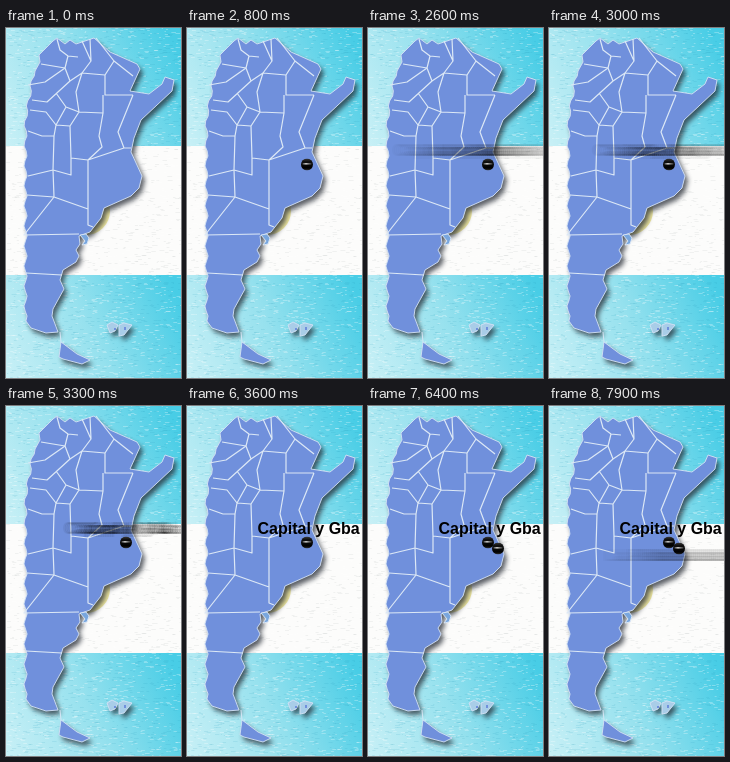
Recreate the animation shown at these times as an HTML page with a canvas. Size 175 px wide and 350 px high, loop 8000 ms.

```html
<!DOCTYPE html>
<html lang="es">
<head>
<meta charset="utf-8">
<title>Mapa</title>
<style>
html, body { margin: 0; width: 100%; height: 100%; overflow: hidden; }
canvas { display: block; width: 175px; height: 350px; }
</style>
</head>
<body>
<canvas id="stage" width="175" height="350"></canvas>
<script>
const W = 175, H = 350, LOOP = 8000, STEP = 100;
const ctx = document.getElementById('stage').getContext('2d');

function layer() {
  const c = document.createElement('canvas');
  c.width = W;
  c.height = H;
  return c.getContext('2d');
}

function random(seed) {
  return () => (seed = (seed * 16807) % 2147483647) / 2147483647;
}

// The east coast is traced; the Andes side follows a gentle wave.
function mainland() {
  let d = `M47 13 L51 10 59 16 64 12 70 16 88 10 104 24 131 36 134 41 124 63 143 66 156 56
    159 49 168 52 166 63 135 92 128 110 125 124 136 148 133 160 125 168 98 180 95 190
    84 204 73 208 74 216 70 222 73 228 70 234 57 242 54 252 58 261 47 281 46 288 52 304 40 305 25 300`;
  for (let y = 293; y > 40; y -= 5) {
    const lean = y > 90 ? 0 : (90 - y) * 0.18;
    d += ` L${19.5 + lean + 1.6 * Math.sin(y * 0.31)} ${y}`;
  }
  return new Path2D(d + ' L34 34 33 27 Z');
}

const MAINLAND = mainland();
const FUEGO = new Path2D('M55 314 L71 326 84 332 76 336 57 331 53 329 Z');
const PENINSULA = new Path2D('M74 207 L80 206 83 210 81 216 76 217 79 213 Z');
const ISLANDS = new Path2D(`M101 297 L106 294 112 297 109 303 104 305 Z
  M113 297 L118 295 126 297 118 307 113 308 Z`);
const BORDERS = new Path2D(`M51 11 L54 22 62 28 72 29 M62 28 L59 40 35 36
  M84 11 L85 33 76 45 99 47 M76 13 L85 33 M90 10 L108 33 127 48
  M108 33 L99 47 V67 H127 M76 45 L70 64 73 84 97 85 V67
  M22 57 L39 54 59 40 64 53 76 45 M26 72 L41 74 64 53 M50 65 L60 79 73 84
  M24 82 L40 84 50 97 60 79 M22 103 L36 108 H48 L50 97 64 98 73 84
  M64 98 L65 130 82 132 M48 108 L47 142 65 147 V130
  M97 85 L93 108 96 119 82 132 V197 L87 199 M127 67 L112 104 118 120 82 132 M118 120 H125
  M22 148 L47 142 48 169 82 181 M21 167 L48 169 18 207 73 206 M20 245 L56 247`);

function drawBackground(g) {
  g.fillStyle = '#fcfcfb';
  g.fillRect(0, 0, W, H);
  for (const [top, bottom] of [[0, 118], [247, H]]) {
    const sky = g.createLinearGradient(0, bottom, W, top + 30);
    sky.addColorStop(0, '#c8f0f6');
    sky.addColorStop(0.5, '#96e1ee');
    sky.addColorStop(1, '#48cde6');
    g.fillStyle = sky;
    g.fillRect(0, top, W, bottom - top);
  }
  // Fine woven paper grain.
  const rnd = random(71);
  for (let i = 0; i < 3200; i++) {
    const x = rnd() * W, y = Math.floor(rnd() * H), length = 1 + rnd() * 4;
    const white = y >= 118 && y < 247;
    g.fillStyle = rnd() < 0.5 ? 'rgba(255,255,255,.28)'
      : white ? 'rgba(120,130,135,.09)' : 'rgba(35,150,180,.12)';
    g.fillRect(x, y, length, 1);
  }
  g.fillStyle = '#eee7a0';
  g.beginPath();
  g.arc(80, 183, 24, 0, 7);
  g.fill();
}

function drawLand(g, shape, blue = '#7090dc') {
  g.save();
  g.shadowColor = 'rgba(35,40,50,.75)';
  g.shadowBlur = 5;
  g.shadowOffsetX = 3;
  g.shadowOffsetY = 4;
  g.fillStyle = blue;
  g.fill(shape);
  g.restore();
  g.strokeStyle = '#d4e2f5';
  g.lineWidth = 0.9;
  g.stroke(shape);
}

const base = layer();
drawBackground(base);
base.lineJoin = 'round';
drawLand(base, MAINLAND);
drawLand(base, FUEGO);
drawLand(base, ISLANDS, '#a9cde8');
base.strokeStyle = '#dce8f6';
base.lineWidth = 1.2;
base.stroke(BORDERS);
base.fillStyle = '#78a6de';
base.fill(PENINSULA);
base.lineWidth = 0.9;
base.stroke(PENINSULA);
base.beginPath();
base.moveTo(54, 304);
base.lineTo(55, 314);
base.stroke();
base.fillStyle = '#7090dc';
base.fillRect(108, 300, 2, 2);
base.fillRect(118, 299, 2, 3);

const smear = layer();
smear.font = 'bold 16px "Liberation Sans", Arial, sans-serif';

// Averages copies of the label over a horizontal spread that closes to zero.
function drawLabel(label, t) {
  if (t < label.start) return;
  const left = Math.max(0, label.start + 1600 - t) / STEP;
  const spread = left * 4.7;
  const copies = 1 + 2 * Math.ceil(spread / 2);
  smear.globalCompositeOperation = 'source-over';
  smear.clearRect(0, 0, W, H);
  smear.globalCompositeOperation = 'lighter';
  smear.globalAlpha = 1 / copies;
  for (let i = 0; i < copies; i++) {
    const shift = copies > 1 ? spread * (2 * i / (copies - 1) - 1) : 0;
    smear.fillText(label.text, label.x + shift, label.y);
  }
  ctx.drawImage(smear.canvas, 0, 0);
}

function drawBall(ball, t) {
  const alpha = Math.min(1, (t - ball.start + STEP) / 800);
  if (alpha <= 0) return;
  ctx.save();
  ctx.globalAlpha = alpha;
  ctx.translate(ball.x, ball.y);
  ctx.beginPath();
  ctx.arc(0, 0, 6, 0, 7);
  ctx.clip();
  const shade = ctx.createLinearGradient(0, -6, 0, 6);
  shade.addColorStop(0, '#3a3a3a');
  shade.addColorStop(0.25, '#111');
  shade.addColorStop(0.8, '#000');
  shade.addColorStop(1, '#333');
  ctx.fillStyle = shade;
  ctx.fillRect(-6, -6, 12, 12);
  const shine = ctx.createLinearGradient(-5, 0, 5, 0);
  shine.addColorStop(0, 'rgba(190,190,190,.2)');
  shine.addColorStop(0.4, '#d0d0d0');
  shine.addColorStop(1, 'rgba(150,150,150,.2)');
  ctx.fillStyle = shine;
  ctx.fillRect(-4.5, -1.5, 9, 1.6);
  ctx.restore();
}

const balls = [
  { x: 120, y: 136.5, start: 100 },
  { x: 130, y: 142.5, start: 5700 }
];
const labels = [
  { text: 'Capital y Gba', x: 70.5, y: 128, start: 2000 },
  { text: 'La Plata', x: 114, y: 155, start: 7600 }
];

let shown = -1;
function frame(now) {
  const t = Math.floor((now % LOOP) / STEP) * STEP;
  if (t !== shown) {
    shown = t;
    ctx.drawImage(base.canvas, 0, 0);
    balls.forEach(ball => drawBall(ball, t));
    labels.forEach(label => drawLabel(label, t));
  }
  requestAnimationFrame(frame);
}
frame(0);
</script>
</body>
</html>
```
